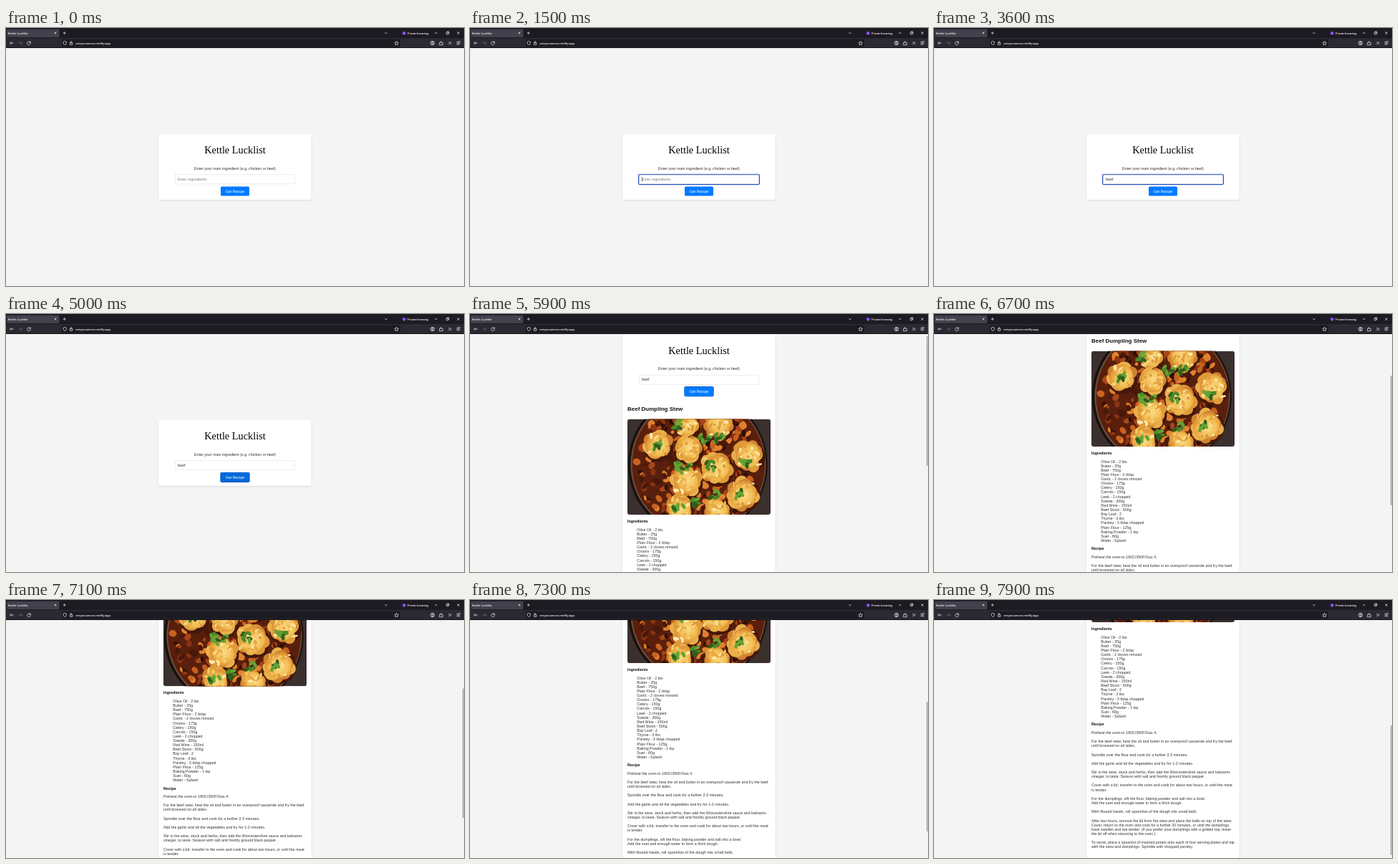
Animation, 640 px wide and 360 px high, one loop 8 s. Source, as an HTML page:

```html
<!DOCTYPE html>
<html lang="en">
<head>
<meta charset="utf-8">
<title>Kettle Lucklist</title>
<style>
html, body { margin: 0; width: 100%; height: 100%; overflow: hidden; background: #f4f4f4; }
/* Laid out as a 1920 x 1080 desktop, shown at one third */
#desk { position: absolute; left: 0; top: 0; width: 1920px; height: 1080px; overflow: hidden;
  transform: scale(.333333); transform-origin: 0 0;
  font: 16px/18.4px "Liberation Sans", Arial, sans-serif; color: #333; }
#desk div, #desk svg { position: absolute; box-sizing: border-box; white-space: pre; }
#bar { left: 0; top: 0; }
#bar text { font-family: "Open Sans", "Noto Sans", sans-serif; font-weight: 600; fill: #fff; }
#view { left: 0; top: 84px; width: 1920px; height: 996px; overflow: hidden; background: #f4f4f4; }
#card { left: 640px; width: 640px; background: #fff; border-radius: 8px; box-shadow: 0 4px 8px rgba(0,0,0,.1); }
#card .mid { left: 0; width: 640px; text-align: center; }
#card .row { left: 20px; }
#title { top: 49px; font: 43px/40px "Liberation Serif", "Times New Roman", serif; color: #000; }
#field { left: 68px; top: 171px; width: 504px; height: 40px; padding: 0 11px; line-height: 38px;
  background: #fff; border: 1px solid #ccc; }
#field.focus { border-color: #2a50b8; border-radius: 4px; box-shadow: 0 0 0 3px #2a50b8; }
#caret { border-left: 2px solid #000; margin-right: -2px; }
#hint { color: #808080; }
#go { left: 260px; top: 221px; width: 120px; height: 39px; line-height: 39px; border-radius: 5px;
  color: #fff; text-align: center; }
#go.focus { box-shadow: 0 0 0 2px #0a4fb5; }
#result { left: 0; top: 0; }
b { color: #111; }
#thumb { left: 1915px; width: 3px; height: 543px; border-radius: 2px; background: #777; }
</style>
</head>
<body>
<div id="desk">
  <div id="view">
    <div id="card">
      <div id="title" class="mid">Kettle Lucklist</div>
      <div class="mid" style="top:136px">Enter your main ingredient (e.g. chicken or beef)</div>
      <div id="field"><span id="typed"></span><span id="caret"></span><span id="hint">Enter ingredients</span></div>
      <div id="go">Get Recipe</div>
      <div id="result">
        <div class="row" style="top:298px;font-size:24px;line-height:28px"><b>Beef Dumpling Stew</b></div>
        <svg id="photo" class="row" style="top:356px;border-radius:10px" width="600" height="400"></svg>
        <div class="row" style="top:775px"><b>Ingredients</b></div>
        <div style="left:60px;top:810px">Olive Oil - 2 tbs
Butter - 25g
Beef - 750g
Plain Flour - 2 tblsp
Garlic - 2 cloves minced
Onions - 175g
Celery - 150g
Carrots - 150g
Leek - 2 chopped
Swede - 200g
Red Wine - 150ml
Beef Stock - 500g
Bay Leaf - 2
Thyme - 3 tbs
Parsley - 3 tblsp chopped
Plain Flour - 125g
Baking Powder - 1 tsp
Suet - 60g
Water - Splash</div>
        <div class="row" style="top:1175px"><b>Recipe</b></div>
        <div class="row" style="top:1209.5px">Preheat the oven to 180C/350F/Gas 4.

For the beef stew, heat the oil and butter in an ovenproof casserole and fry the beef
until browned on all sides.

Sprinkle over the flour and cook for a further 2-3 minutes.

Add the garlic and all the vegetables and fry for 1-2 minutes.

Stir in the wine, stock and herbs, then add the Worcestershire sauce and balsamic
vinegar, to taste. Season with salt and freshly ground black pepper.

Cover with a lid, transfer to the oven and cook for about two hours, or until the meat
is tender.

For the dumplings, sift the flour, baking powder and salt into a bowl.
Add the suet and enough water to form a thick dough.

With floured hands, roll spoonfuls of the dough into small balls.

After two hours, remove the lid from the stew and place the balls on top of the stew.
Cover, return to the oven and cook for a further 20 minutes, or until the dumplings
have swollen and are tender. (If you prefer your dumplings with a golden top, leave
the lid off when returning to the oven.)

To serve, place a spoonful of mashed potato onto each of four serving plates and top
with the stew and dumplings. Sprinkle with chopped parsley.</div>
      </div>
    </div>
    <div id="thumb"></div>
  </div>
  <svg id="bar" width="1920" height="84" fill="none" stroke="#fbfbfe" stroke-width="2">
    <g stroke="none">
      <path fill="#1c1b22" d="M0 0h1920v42H0z"/>
      <path fill="#2b2a33" d="M0 42h1920v42H0z"/>
      <path fill="#0c0c0d" d="M0 82h1920v2H0z"/>
      <rect x="3" y="5" width="220" height="34" rx="4" fill="#42414d"/>
      <rect x="234" y="47" width="1419" height="32" rx="4" fill="#1c1b22"/>
      <circle cx="1669" cy="22" r="7" fill="#8a4df0"/>
      <text x="9" y="26" font-size="12.3">Kettle Lucklist</text>
      <text x="292" y="68" font-size="12.3">recipecannon.netlify.app</text>
      <text x="1683" y="26" font-size="10.9">Private browsing</text>
    </g>
    <!-- tab strip -->
    <path d="M203 17l8 8m0-8l-8 8M239 21h12m-6-6v12M1588 19l5 5 5-5M1798 21h10M1891 16l10 10m0-10l-10 10M1846 18h8v8h-8zM1849 18v-3h8v8h-3"/>
    <!-- toolbar -->
    <path d="M32 63H17m6-6l-6 6 6 6"/>
    <path stroke="#77767f" d="M52 63h15m-6-6l6 6-6 6"/>
    <path d="M102 60a7 7 0 1 0 1 4M103 55v6h-6"/>
    <path d="M247 55l7 3q0 10-7 14-7-4-7-14zM268 62h10v8h-10zM270 62v-3a3 3 0 0 1 6 0v3"/>
    <path d="M1637 55l2.500 5.500 6 .600-4.500 4 1.300 6-5.300-3.100-5.300 3.100 1.300-6-4.500-4 6-.600z"/>
    <circle cx="1788" cy="63" r="8"/><circle cx="1788" cy="61" r="3"/><path d="M1783 69q5-5 10 0"/>
    <path d="M1817 62h4v-5h5v5h5v9h-14zM1855 57l6 6-6 6m6-12l6 6-6 6M1889 58h14m-14 5h14m-14 5h14"/>
    <circle cx="1901" cy="56" r="3" fill="#45c8a0" stroke="none"/>
  </svg>
</div>
<script>
const $ = id => document.getElementById(id);
const clamp = (v, lo = 0, hi = 1) => Math.min(hi, Math.max(lo, v));

const WORD = 'beef';
const KEYS = [2500, 2700, 2900, 3100];
const FOCUS = 1400, CLICK = 4500, RESULT = 5300, HOVER = 3900;
const SCROLL = [[6100, 0], [6700, 285], [7300, 576], [7650, 747]];

function drawPhoto() {
  let seed = 7;
  const rnd = () => (seed = seed * 16807 % 2147483647) / 2147483647;
  const pick = list => list[Math.floor(rnd() * list.length)];
  const blob = (x, y, rx, ry, fill, turn = 0) =>
    `<ellipse cx="${x}" cy="${y}" rx="${rx}" ry="${ry}" fill="${fill}" transform="rotate(${turn} ${x} ${y})"/>`;

  let art = `<defs><radialGradient id="dough" cx=".5" cy=".4" r=".6">
    <stop offset="0" stop-color="#fbdc88"/><stop offset=".6" stop-color="#f2bd52"/>
    <stop offset="1" stop-color="#d98d30"/></radialGradient></defs>
    <rect width="600" height="400" fill="#3a302d"/>` +
    blob(295, 190, 292, 300, '#17100e') + blob(297, 190, 284, 290, '#6b4a3a') +
    blob(298, 190, 278, 284, '#5a1f0c');

  const sauce = ['#a9441a', '#c9621f', '#4a180b', '#8c3412', '#e0812f', '#2a100a'];
  for (let i = 0; i < 330; i++) {
    const a = rnd() * 6.283, r = Math.sqrt(rnd()) * 265;
    art += blob(297 + r * Math.cos(a), 190 + r * Math.sin(a), 7 + rnd() * 13, 5 + rnd() * 10, pick(sauce), rnd() * 180);
  }
  const dumplings = [[125, 108, 64], [250, 25, 52], [382, 28, 58], [255, 125, 60], [505, 152, 68],
    [372, 205, 70], [245, 262, 66], [482, 312, 70], [218, 372, 58], [375, 385, 58]];
  for (const [x, y, r] of dumplings) {
    art += blob(x + 5, y + 8, r, r, '#45170a');
    // Ragged edge, then a smooth top with crumbs
    for (let i = 0; i < 9; i++) {
      const a = i * .698 + rnd() * .5, far = r * (.45 + rnd() * .2);
      art += blob(x + far * Math.cos(a), y + far * Math.sin(a), r * .48, r * .4,
        pick(['#e09a3a', '#eab04c', '#cf8230']), rnd() * 180);
    }
    art += blob(x, y, r * .82, r * .74, 'url(#dough)', rnd() * 180);
    for (let i = 0; i < 22; i++)
      art += blob(x + (rnd() - .5) * r * 1.4, y + (rnd() - .5) * r * 1.3, 4 + rnd() * 10, 2 + rnd() * 5,
        pick(['#fde9ac', '#dd9638', '#f6cc6a', '#e9a945']), rnd() * 180);
  }
  const herbs = [[130, 112], [210, 195], [245, 205], [340, 195], [325, 85], [380, 75], [495, 190],
    [215, 370], [365, 312], [470, 310], [205, 20], [290, 350]];
  for (const [x, y] of herbs)
    for (let i = 0; i < 7; i++)
      art += blob(x + (rnd() - .5) * 42, y + (rnd() - .5) * 34, 13, 7, pick(['#4a8a28', '#66a233', '#2f5f1b']), rnd() * 180);
  $('photo').innerHTML = art;
}

function scrollAt(t) {
  let pos = 0;
  SCROLL.slice(1).forEach(([end, to], i) => {
    const [start, from] = SCROLL[i];
    pos += (to - from) * clamp((t - start) / (end - start));
  });
  return pos;
}

function render(t) {
  const typed = KEYS.filter(k => k <= t).length;
  const blinkStart = typed ? KEYS[typed - 1] : FOCUS;
  const focused = t >= FOCUS && t < CLICK;
  $('field').className = focused ? 'focus' : '';
  $('typed').textContent = WORD.slice(0, typed);
  $('hint').style.display = typed ? 'none' : '';
  $('caret').style.visibility = focused && (t - blinkStart) % 1000 < 500 ? '' : 'hidden';

  const done = t >= RESULT;
  const hover = done ? 0 : clamp((t - HOVER) / 300);
  $('go').className = t >= CLICK ? 'focus' : '';
  $('go').style.background = `color-mix(in srgb, #0069d9 ${hover * 100}%, #007bff)`;

  const scroll = scrollAt(t);
  $('result').style.display = $('thumb').style.display = done ? '' : 'none';
  $('card').style.top = (done ? -scroll : 359) + 'px';
  $('card').style.height = (done ? 1743 : 276) + 'px';
  $('thumb').style.top = 9 + scroll * .578 + 'px';
}

function tick() {
  render(performance.now() % 8000);
  requestAnimationFrame(tick);
}
drawPhoto();
tick();
</script>
</body>
</html>
```
